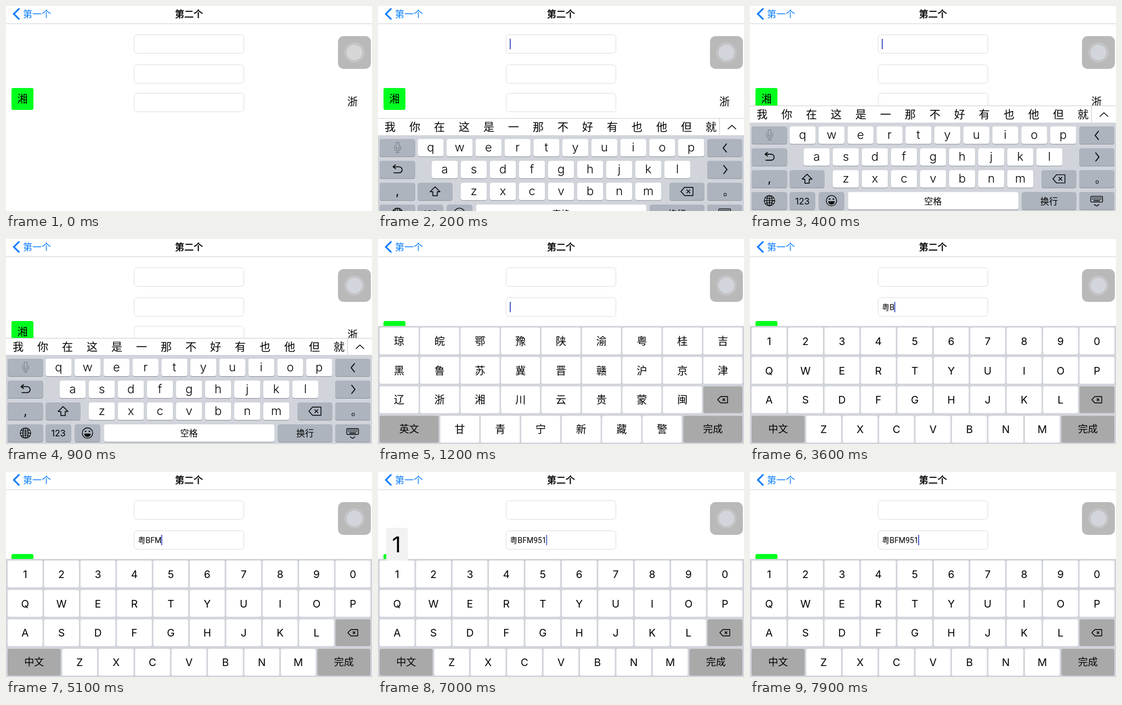
An HTML page with a canvas that plays this animation: 667x375 px, repeating every 8000 ms.

```html
<!DOCTYPE html>
<html lang="zh">
<head>
<meta charset="utf-8">
<style>
  html, body { margin: 0; width: 100%; height: 100%; overflow: hidden; background: #fff; }
  canvas { display: block; width: 667px; height: 375px; }
</style>
</head>
<body>
<canvas id="stage"></canvas>
<script>
const W = 667, H = 375, LOOP = 8000, STEP = 100;
const SANS = 'Inter, "Noto Sans CJK SC", "Noto Sans CJK", sans-serif';
const FIELD_FONT = '14px Roboto, "Noto Sans CJK SC", "Noto Sans CJK", sans-serif';
const TRAY = '#d1d4db', MUTED = '#adb4be', GREY = '#a9a9a9';

const canvas = document.getElementById('stage');
const ctx = canvas.getContext('2d');
const dpr = window.devicePixelRatio || 1;
canvas.width = W * dpr;
canvas.height = H * dpr;

const ZH_ROWS = ['琼皖鄂豫陕渝粤桂吉', '黑鲁苏冀晋赣沪京津', '辽浙湘川云贵蒙闽', '甘青宁新藏警'];
const EN_ROWS = ['1234567890', 'QWERTYUIOP', 'ASDFGHJKL', 'ZXCVBNM'];
const ZH = { rows: ZH_ROWS, pitch: 73.75, keyW: 71, side: 107.5, toggle: '英文', icon: 628 };
const EN = { rows: EN_ROWS, pitch: 66.4, keyW: 63.5, side: 96.5, toggle: '中文', icon: 632 };

const SHOW = 100, SWITCH = 1200, LETTERS = 2700;
const TAPS = [
  { at: 2500, up: 2700, ch: '粤' }, { at: 3400, up: 3600, ch: 'B' },
  { at: 4200, up: 4500, ch: 'F' }, { at: 4800, up: 5000, ch: 'M' },
  { at: 5400, up: 5600, ch: '9' }, { at: 5900, up: 6100, ch: '5' },
  { at: 6500, up: 7100, ch: '1' }
];

function box(x, y, w, h, r, fill) {
  ctx.beginPath();
  ctx.roundRect(x, y, w, h, r);
  if (fill) { ctx.fillStyle = fill; ctx.fill(); }
}

function circle(x, y, r, fill) {
  ctx.beginPath();
  ctx.arc(x, y, r, 0, Math.PI * 2);
  if (fill) { ctx.fillStyle = fill; ctx.fill(); }
}

function line(points, width = 1.5, color = '#000', close = false) {
  ctx.beginPath();
  points.forEach(([x, y], i) => i ? ctx.lineTo(x, y) : ctx.moveTo(x, y));
  if (close) ctx.closePath();
  ctx.lineWidth = width;
  ctx.strokeStyle = color;
  ctx.stroke();
}

function curve(d, width = 1.4, color = '#000') {
  ctx.lineWidth = width;
  ctx.strokeStyle = color;
  ctx.stroke(new Path2D(d));
}

function text(s, x, y, size, { color = '#000', align = 'center', weight = 400 } = {}) {
  ctx.font = `${weight} ${size}px ${SANS}`;
  ctx.textAlign = align;
  ctx.fillStyle = color;
  ctx.fillText(s, x, y);
}

// Centres caps and ideographs on y.
function label(s, x, y, size, opts) {
  text(s, x, y + size * 0.37, size, opts);
}

function backspace(x, y, w, h) {
  const l = x - w / 2, r = x + w / 2, t = y - h / 2, b = y + h / 2, n = w * 0.3, c = h * 0.19;
  ctx.lineJoin = 'round';
  line([[l, y], [l + n, t], [r, t], [r, b], [l + n, b]], 1.4, '#000', true);
  const m = x + w * 0.12;
  line([[m - c, y - c], [m + c, y + c]], 1.4);
  line([[m + c, y - c], [m - c, y + c]], 1.4);
}

function drawPage() {
  ctx.fillStyle = '#fff';
  ctx.fillRect(0, 0, W, H);
  ctx.fillStyle = '#d2d2d2';
  ctx.fillRect(0, 32, W, 1);
  ctx.lineJoin = 'miter';
  line([[24.3, 4.5], [14.3, 14.5], [24.3, 24.5]], 3, '#007aff');
  label('第一个', 31, 15, 17, { color: '#007aff', align: 'left' });
  label('第二个', 333.5, 15, 17);
  ctx.lineWidth = 0.5;
  ctx.strokeStyle = '#000';
  ctx.strokeText('第二个', 333.5, 15 + 17 * 0.37);

  for (const y of [52.5, 107.5, 159.5]) {
    box(233.5, y, 200, 34, 5);
    ctx.lineWidth = 1;
    ctx.strokeStyle = '#dedede';
    ctx.stroke();
  }
  box(10, 150, 40, 40, 3, '#00ff1e');
  label('湘', 30, 170, 19);
  label('浙', 631.5, 175, 19);
}

function drawAssist(tinted) {
  box(605, 55, 60, 60, 10, '#b9b9b9');
  circle(635, 85, 18.5, '#c6c6c6');
  circle(635, 85, 16.5, '#c0c0c2');
  circle(635, 85, 14.5, tinted ? '#d2d5dc' : '#d6d6d6');
}

function softKey(x, y, w, fill = '#fff') {
  box(x, y + 1, w, 32, 4, '#8b8f96');
  box(x, y, w, 32, 4, fill);
}

function letterRow(s, x, y, pitch) {
  [...s].forEach((ch, i) => {
    softKey(x + i * pitch, y, 47.3);
    text(ch, x + i * pitch + 23.6, y + 22.5, 22, { weight: 300 });
  });
}

function drawSystemIcons() {
  ctx.lineCap = ctx.lineJoin = 'round';
  box(33, 225, 5.5, 12, 2.75);
  ctx.lineWidth = 1.2;
  ctx.strokeStyle = '#7b828c';
  ctx.stroke();
  curve('M30 232v3a5.7 5.7 0 0 0 11.4 0v-3M35.7 241v3M32.5 244h6.5', 1.2, '#7b828c');

  curve('M28 270h10.5a5.5 5.5 0 0 1 0 11H29', 1.6);
  line([[32, 266.5], [27.5, 270], [32, 273.5]], 1.6);
  line([[635, 228], [629, 235.5], [635, 243]], 1.7);
  line([[630, 267.5], [636, 275], [630, 282.5]], 1.7);
  line([[104, 306.5], [113, 315.5], [108, 315.5], [108, 323], [100, 323], [100, 315.5], [95, 315.5]], 1.5, '#000', true);
  backspace(563, 315, 22, 15);

  circle(35.5, 355, 9.5);
  curve('M26 355h19M35.5 345.5v19M28 349.5q7.5 4 15 0M28 360.5q7.5 -4 15 0', 1.2);
  ctx.beginPath();
  ctx.arc(35.5, 355, 9.5, 0, 7);
  ctx.ellipse(35.5, 355, 5, 9.5, 0, 0, 7);
  ctx.stroke();

  circle(148.5, 355, 9.5);
  ctx.lineWidth = 1.3;
  ctx.stroke();
  circle(145, 352, 1.4, '#000');
  circle(152, 352, 1.4, '#000');
  ctx.fill(new Path2D('M142.5 356h12a6 6 0 0 1 -12 0z'));

  box(621, 347, 21.5, 10.5, 1.5);
  ctx.lineWidth = 1.3;
  ctx.stroke();
  ctx.fillStyle = '#000';
  for (let r = 0; r < 2; r++)
    for (let c = 0; c < 6; c++) ctx.fillRect(623.5 + c * 3, 349 + r * 2.7, 1.7, 1.6);
  ctx.fillRect(626, 354.3, 11.5, 1.5);
  line([[627.5, 362], [631.7, 364.7], [636, 362]], 1.4);
  ctx.lineCap = 'butt';
}

function drawSystemKeyboard(offset) {
  ctx.save();
  ctx.translate(0, offset);
  ctx.fillStyle = TRAY;
  ctx.fillRect(0, 212, W, 170);
  ctx.fillStyle = '#fff';
  ctx.fillRect(0, 181, W, 31);
  ctx.fillStyle = '#c9ccd1';
  ctx.fillRect(0, 181, W, 1);
  ctx.fillRect(622, 181, 1, 31);
  [...'我你在这是一那不好有也他但就'].forEach((ch, i) => label(ch, 22 + i * 45, 197.5, 20));
  line([[637.5, 201], [645, 194], [652.5, 201]], 1.4);

  [219, 259, 299, 339].forEach(y => {
    softKey(3, y, 64.5, MUTED);
    softKey(600, y, 64, MUTED);
  });
  letterRow('qwertyuiop', 72.3, 219, 52.75);
  letterRow('asdfghjkl', 98, 259, 53);
  letterRow('zxcvbnm', 151, 299, 53);
  softKey(72.5, 299, 63, MUTED);
  softKey(531.5, 299, 63, MUTED);
  softKey(72.5, 339, 46, MUTED);
  softKey(125.5, 339, 46, MUTED);
  softKey(178.5, 339, 310.5);
  softKey(495.5, 339, 99, MUTED);

  text(',', 35.5, 321.5, 22);
  text('。', 638.5, 322.5, 19);
  label('123', 95.5, 355.5, 16);
  label('空格', 333.5, 355.5, 16);
  label('换行', 545, 355.5, 16);
  drawSystemIcons();
  ctx.restore();
}

function keyRect(kb, row, col) {
  const x0 = row === 3 ? 3 + kb.side + 3 : 3;
  return { x: x0 + col * kb.pitch, y: 162 + row * 53.8, w: kb.keyW, h: 49 };
}

function drawPlateKeyboard(kb) {
  ctx.fillStyle = TRAY;
  ctx.fillRect(0, 159, W, H - 159);
  kb.rows.forEach((row, r) => [...row].forEach((ch, c) => {
    const k = keyRect(kb, r, c);
    box(k.x, k.y, k.w, k.h, 3, '#fff');
    label(ch, k.x + k.w / 2, k.y + 24.7, 19);
  }));
  const del = keyRect(kb, 2, kb.rows[2].length);
  box(del.x, del.y, del.w, del.h, 3, GREY);
  backspace(kb.icon, 294, 18, 11.5);

  const y = keyRect(kb, 3, 0).y;
  const right = 664 - kb.side;
  box(3, y, kb.side, 49, 3, GREY);
  box(right, y, kb.side, 49, 3, GREY);
  label(kb.toggle, 3 + kb.side / 2, y + 24.3, 18);
  label('完成', right + kb.side / 2, y + 24.3, 18);
}

function drawPopup(kb, ch) {
  const row = kb.rows.findIndex(s => s.includes(ch));
  const k = keyRect(kb, row, [...kb.rows[row]].indexOf(ch));
  const cx = k.x + k.w / 2;
  box(cx - 19.7, k.y - 60, 39.4, 60, 3, '#f2f2f2');
  text(ch, cx - 1, k.y - 15, 40);
}

// Half a second on, a soft fade, half a second off.
function caretAlpha(since) {
  const s = since % 1000;
  if (since >= 1000 && s < 100) return 0.5;
  return s < 500 ? 1 : Math.max(0, 0.85 - (s - 500) / 240);
}

function drawCaret(x, y, alpha) {
  ctx.globalAlpha = alpha;
  ctx.fillStyle = '#4560c8';
  ctx.fillRect(x, y, 2, 19);
  ctx.globalAlpha = 1;
}

function draw(t) {
  ctx.setTransform(dpr, 0, 0, dpr, 0, 0);
  drawPage();
  if (t >= SHOW) {
    const done = TAPS.filter(p => t >= p.at);
    const last = done[done.length - 1];
    const since = t - (last ? last.at : t >= SWITCH ? SWITCH : SHOW);
    if (t < SWITCH) {
      drawCaret(240, 60, caretAlpha(since));
      const slide = 110 * Math.exp((SHOW - t) / 66);
      drawSystemKeyboard(slide < 0.4 ? 0 : slide);
    } else {
      const typed = done.map(p => p.ch).join('');
      ctx.font = FIELD_FONT;
      ctx.textAlign = 'left';
      ctx.fillStyle = '#000';
      ctx.fillText(typed, 240.5, 129.7);
      drawCaret(240 + ctx.measureText(typed).width, 115, caretAlpha(since));
      const kb = t < LETTERS ? ZH : EN;
      drawPlateKeyboard(kb);
      if (last && t < last.up) drawPopup(kb, last.ch);
    }
  }
  drawAssist(t >= SHOW);
}

const start = performance.now();
function tick() {
  const t = (performance.now() - start) % LOOP;
  draw(Math.floor(t / STEP) * STEP);
  requestAnimationFrame(tick);
}
tick();
</script>
</body>
</html>
```
